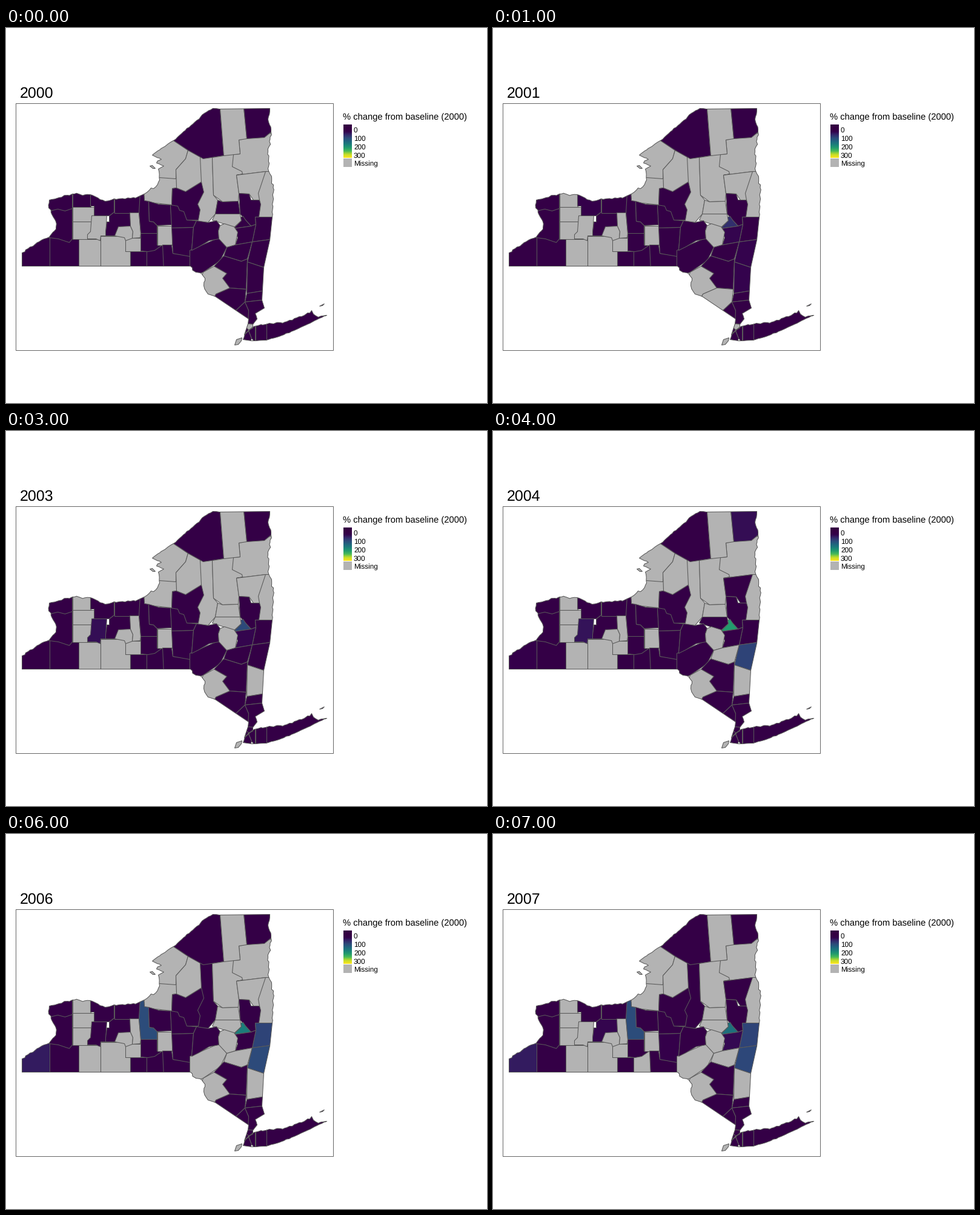
Write a matplotlib script that moves like this. It is 794 px wide and 618 px high and loops after 8 s.

```python
import numpy as np
import matplotlib.pyplot as plt
from matplotlib.animation import FuncAnimation
from matplotlib.colors import LinearSegmentedColormap, Normalize
from matplotlib.patches import PathPatch, Polygon, Rectangle
from matplotlib.path import Path

W, H = 794, 618
YEARS = range(8)
GREY, EDGE = "#b3b3b3", "#595959"
LOW, HIGH = -57, 336  # percent at the two ends of the colour bar

scale = LinearSegmentedColormap.from_list("scale", [
    "#340042", "#340042", "#34004a", "#33286a", "#2d4a7a", "#20657f",
    "#1b7f7b", "#219b6e", "#48ba58", "#c0dc2a", "#fce51f"])
norm = Normalize(LOW, HIGH)

plt.rcParams["font.family"] = "Liberation Sans"
plt.rcParams["text.hinting"] = "no_hinting"
fig = plt.figure(figsize=(W / 100, H / 100), dpi=100, facecolor="white")
ax = fig.add_axes([0, 0, 1, 1])
rng = np.random.default_rng(4)


def pairs(xy):
    return np.reshape(xy, (-1, 2)).astype(float)


def rough(*xy, wobble=0.8, step=4):
    """Polyline through the key points with a seeded, ragged shoreline."""
    points = pairs(xy)
    line = []
    for a, b in zip(points[:-1], points[1:]):
        n = max(1, int(np.hypot(*(b - a)) / step))
        t = np.linspace(0, 1, n, endpoint=False)[:, None]
        noise = rng.normal(0, wobble, (n, 2))
        noise[0] = 0
        line.append(a + (b - a) * t + noise)
    return np.vstack(line + [points[-1:]])


def closed(*parts):
    ring = np.vstack(parts)
    return Path(np.vstack([ring, ring[:1]]), closed=True)


mainland = closed(
    rough(26, 370, 51, 353, 71, 344, 82, 331, 82, 319, 70, 296, 71, 283, 109, 273,
          138, 274, 163, 285, 178, 281, 205, 280, 221, 276, 247, 261, 253, 250,
          251, 232, 260, 227, 248, 222, 256, 216, 241, 209, 250, 202, 276, 185),
    rough(276, 185, 305, 160, 327, 140, 341, 132, 352, 133, wobble=0.4),
    rough(435, 132, 432, 150, 437, 171, 432, 203, 433, 235, 441, 258, 439, 311),
    pairs([435, 349, 425, 394, 422, 448, 426, 461]),
    rough(411, 470, 414, 479, 407, 488, 407, 494, 400, 497, 393, 505, wobble=0.4),
    pairs([399, 487, 400, 479, 345, 442]),
    rough(345, 442, 333, 438, 326, 424, 328, 412, 322, 404, 313, 402, 304, 392),
    pairs([26, 392]))
island = closed(
    rough(391, 513, 394, 504, 410, 491, 428, 488, 460, 484, 492, 473, 504, 465,
          507, 471, 515, 476, 529, 473),
    rough(529, 473, 505, 484, 475, 498, 450, 508, 429, 514, 405, 515, wobble=0.3))
islets = [closed(pairs(xy)) for xy in (
    [377, 522, 380, 513, 389, 510, 388, 515, 383, 521],
    [237, 227, 241, 226, 246, 231, 242, 231],
    [517, 458, 525, 454, 522, 457])]
land = Path.make_compound_path(mainland, island, *islets)

areas = {}


def area(name, *xy):
    """Paint a county cut to the land; later ones cover earlier overlaps."""
    patch = Polygon(pairs(xy), ec=EDGE, lw=0.75, joinstyle="round")
    ax.add_patch(patch)
    patch.set_clip_path(land, ax.transData)
    areas[name] = patch


def box(name, left, top, right, bottom):
    area(name, left, top, right, top, right, bottom, left, bottom)


# West
box("Chautauqua", 20, 340, 71, 400)
box("Cattaraugus", 71, 340, 119, 400)
box("Allegany", 119, 347, 155, 400)
box("Steuben", 155, 342, 204, 400)
area("Erie", 60, 345, 71, 345, 86, 347, 104, 353, 109, 347, 109, 290, 60, 290)
area("Niagara", 60, 265, 109, 265, 109, 297, 97, 301, 85, 298, 72, 301, 60, 297)
box("Genesee", 109, 294, 145, 318)
box("Wyoming", 109, 318, 141, 347)
box("Orleans", 109, 265, 139, 294)
area("Livingston", 141, 309, 150, 308, 166, 307, 164, 342, 156, 342, 155, 350,
     148, 347, 134, 347, 134, 340, 139, 335)
area("Ontario", 164, 342, 164, 335, 166, 319, 170, 319, 170, 309, 178, 303, 205, 303,
     205, 326, 179, 342)
area("Monroe", 139, 260, 178, 260, 178, 303, 170, 309, 145, 309, 145, 293, 139, 293)
box("Wayne", 178, 260, 221, 304)
box("Schuyler", 196, 345, 222, 367)
area("Yates", 185, 327, 205, 326, 209, 335, 208, 346, 197, 350, 195, 345, 179, 342)
area("Seneca", 204, 304, 219, 304, 222, 338, 221, 345, 208, 346, 209, 335, 205, 326)
box("Chemung", 204, 367, 231, 400)

# Centre
box("Tioga", 231, 357, 259, 400)
area("Tompkins", 222, 338, 249, 338, 249, 357, 258, 357, 245, 366, 234, 368, 222, 367)
area("Oswego", 227, 270, 240, 240, 281, 248, 281, 263, 274, 264, 273, 291, 228, 286)
area("Cayuga", 221, 270, 227, 268, 228, 284, 235, 285, 236, 318, 243, 319, 249, 325,
     249, 338, 222, 338, 219, 304)
area("Onondaga", 235, 285, 252, 290, 271, 291, 273, 324, 249, 325, 243, 319, 236, 318)
box("Cortland", 249, 325, 273, 357)
area("Broome", 258, 357, 273, 357, 275, 371, 303, 375, 303, 400, 260, 400)
area("Herkimer", 320, 212, 340, 213, 342, 275, 349, 283, 345, 306, 333, 320, 310, 318,
     310, 270)
area("Oneida", 281, 263, 296, 269, 322, 253, 326, 270, 316, 290, 320, 299, 317, 316,
     290, 316, 273, 291, 274, 264)
area("Chenango", 273, 329, 309, 328, 306, 366, 303, 376, 275, 371)
area("Madison", 271, 291, 283, 293, 286, 300, 293, 302, 298, 316, 314, 317, 309, 328,
     273, 329)

# North
area("Jefferson", 225, 180, 276, 185, 300, 201, 296, 215, 280, 233, 280, 248, 225, 244)
area("Lewis", 300, 201, 320, 212, 322, 253, 296, 269, 281, 263, 280, 233, 296, 215)
area("St Lawrence", 276, 185, 260, 120, 352, 120, 359, 210, 325, 215, 300, 201)
area("Hamilton", 340, 213, 359, 210, 376, 205, 392, 240, 380, 242, 384, 272, 383, 285,
     357, 286, 342, 275)
box("Washington", 414, 234, 450, 311)
area("Essex", 384, 184, 450, 170, 450, 236, 428, 236, 380, 242, 390, 240, 389, 236,
     373, 228, 375, 208, 386, 207)
area("Franklin", 352, 120, 391, 120, 397, 182, 384, 184, 386, 207, 359, 210)
area("Clinton", 391, 120, 450, 120, 450, 171, 437, 171, 426, 180, 397, 182)
area("Warren", 380, 242, 428, 236, 416, 272, 418, 283, 410, 286, 401, 273, 384, 272)

# Capital district
area("Montgomery", 345, 306, 386, 306, 388, 317, 376, 328, 340, 316)
area("Fulton", 349, 283, 357, 286, 383, 285, 386, 306, 345, 306)
area("Saratoga", 384, 272, 401, 273, 404, 283, 418, 283, 420, 290, 417, 311, 411, 312,
     412, 323, 404, 326, 386, 306)
area("Schenectady", 375, 330, 388, 317, 387, 311, 391, 310, 395, 316, 404, 326)
area("Rensselaer", 411, 311, 450, 311, 450, 346, 406, 352, 412, 323)
area("Albany", 376, 330, 404, 326, 412, 323, 406, 352, 378, 357, 382, 345)
area("Delaware", 303, 366, 351, 345, 364, 361, 353, 383, 325, 402, 303, 410)
area("Otsego", 314, 317, 333, 320, 347, 317, 353, 325, 350, 334, 351, 347, 335, 350,
     318, 360, 306, 366, 309, 328)
area("Schoharie", 353, 325, 360, 322, 376, 327, 382, 336, 378, 357, 364, 361, 351, 347,
     350, 334)

# Hudson valley
area("Greene", 364, 361, 378, 357, 406, 352, 398, 380, 388, 384, 359, 375)
area("Columbia", 406, 352, 450, 346, 450, 394, 425, 394, 398, 385)
area("Sullivan", 325, 402, 343, 392, 364, 404, 369, 428, 346, 438, 340, 450, 310, 440)
area("Ulster", 343, 392, 359, 375, 388, 384, 398, 380, 396, 430, 369, 428, 357, 412,
     364, 404)
area("Orange", 340, 450, 346, 438, 369, 428, 396, 430, 394, 451, 379, 465)
area("Dutchess", 398, 385, 425, 394, 440, 394, 440, 430, 397, 437)
area("Putnam", 397, 437, 440, 430, 440, 446, 394, 451)
area("Rockland", 394, 451, 400, 465, 400, 482, 379, 465)
area("Westchester", 394, 451, 440, 446, 440, 480, 408, 488, 399, 487, 400, 465)

# City and island
box("New York", 388, 487, 400, 506)
area("Bronx", 399, 487, 410, 488, 407, 495, 400, 497, 396, 493)
area("Kings", 390, 504, 400, 499, 405, 511, 402, 518, 390, 518)
area("Queens", 400, 498, 411, 490, 411, 518, 405, 511)
box("Nassau", 411, 480, 429, 520)
box("Suffolk", 429, 450, 535, 520)
box("Richmond", 374, 508, 389.5, 524)

ax.add_patch(PathPatch(land, fc="none", ec=EDGE, lw=0.75))

# Years without data, counted from 2000
missing = {
    "Warren": {0, 1, 2, 3, 5, 6}, "Montgomery": {0, 1, 2, 3, 6, 7},
    "Livingston": {0, 1, 7}, "Bronx": {0, 1}, "Orange": {1}, "Tioga": {7},
    "Herkimer": range(5), "Fulton": range(1, 8), "Orleans": range(1, 8),
    "Dutchess": range(2, 8), "Greene": range(4, 8), "Delaware": range(5, 8)}
for name in ("Franklin", "Jefferson", "Essex", "Lewis", "Oswego", "Hamilton",
             "Washington", "Genesee", "Wyoming", "Allegany", "Steuben", "Yates",
             "Seneca", "Schuyler", "Cortland", "Schoharie", "Sullivan", "Richmond"):
    missing[name] = YEARS

# Percent change by year, zero where absent
change = {
    "Schenectady": {1: 69, 2: 69, 3: 100, 4: 218, 5: 336, 6: 175, 7: 155},
    "Columbia": {1: 25, 4: 93, 5: 100, 6: 100, 7: 98},
    "Rensselaer": {5: 75, 6: 93, 7: 93},
    "Cayuga": {5: 120, 6: 103, 7: 103},
    "Albany": {1: 26, 2: 26, 3: 26, 7: 32},
    "Livingston": {2: 26, 3: 36, 4: 40},
    "Chautauqua": {4: 22, 6: 48, 7: 48},
    "Clinton": {4: 34, 5: 44},
    "Dutchess": {1: 25}, "Monroe": {1: 22}, "Ontario": {7: 26}, "Chenango": {7: 22}}


def label(x, y, text, size):
    return ax.text(x, y, text, fontsize=size * 0.72, color="black")


# Frame and legend
ax.add_patch(Rectangle((15.5, 123), 523.5, 407, fc="none", ec="#666666", lw=0.72))
label(555, 150, "% change from baseline (2000)", 14.75)
ax.imshow(np.linspace(LOW, HIGH, 55)[:, None], cmap=scale, norm=norm, aspect="auto",
          extent=(556.5, 570.5, 213.5, 158.5), interpolation="nearest")
ax.add_patch(Rectangle((556.5, 214.5), 14, 14, fc=GREY, lw=0))
for i, text in enumerate(["0", "100", "200", "300", "Missing"]):
    label(573.5, 171 + 14 * i, text, 11.8)
title = label(22.5, 114, "2000", 25)

ax.set(xlim=(-0.5, W - 0.5), ylim=(H - 0.5, -0.5))
ax.axis("off")


def update(year):
    title.set_text(str(2000 + year))
    for name, patch in areas.items():
        if year in missing.get(name, ()):
            patch.set_facecolor(GREY)
        else:
            value = change.get(name, {}).get(year, 0)
            patch.set_facecolor(scale(norm(value)))


anim = FuncAnimation(fig, update, frames=len(YEARS), interval=1000, repeat=True,
                     init_func=lambda: update(0))
plt.show()
```
